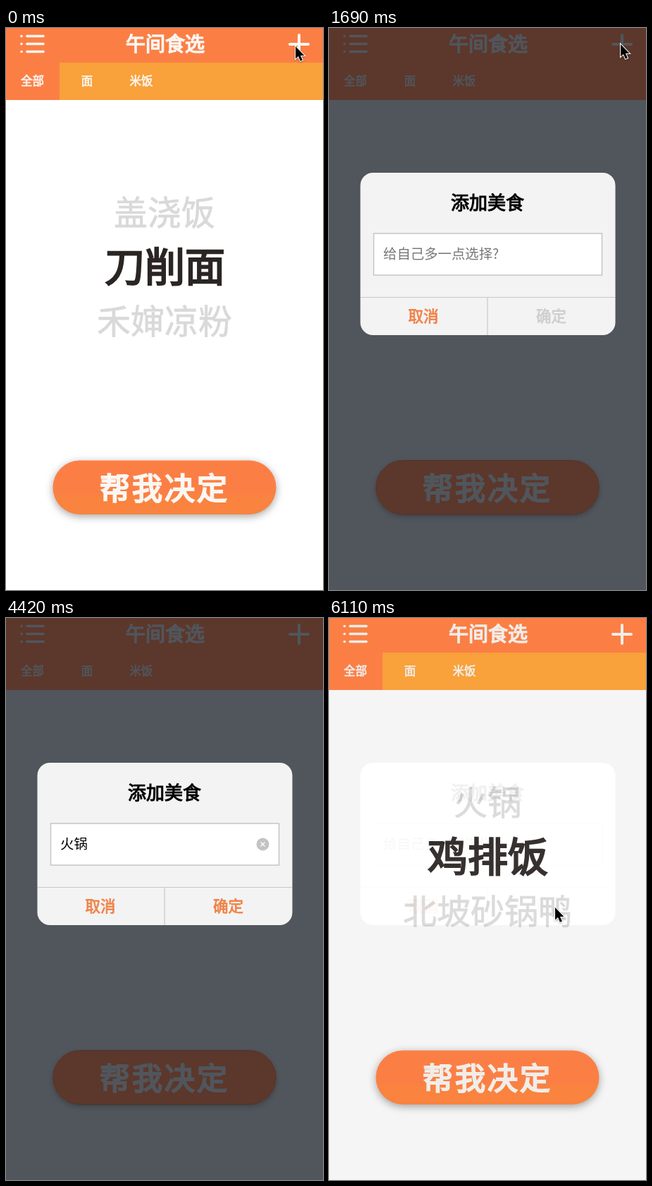
These frames come from a looping animation (450 px wide and 796 px high, 6.24 s). An HTML page:

```html
<!DOCTYPE html>
<html lang="zh-CN">
<head>
<meta charset="utf-8">
<title>午间食选</title>
<style>
  html, body { margin: 0; width: 100%; height: 100%; overflow: hidden; background: #fff; }
  svg { display: block; width: 450px; height: 796px; }
  text { font-family: "Noto Sans CJK SC", "Noto Sans CJK", sans-serif; fill: currentColor; white-space: pre; }
  .mid { text-anchor: middle; }
  .semi { stroke: currentColor; stroke-width: .04em; }
  .heavy { stroke: currentColor; stroke-width: .052em; }
  .tab { font-size: 16.5px; }
  .item { font-size: 48px; color: #d9d9d9; stroke: currentColor; stroke-width: .016em; }
  .field { font-size: 19.4px; }
  .action { font-size: 21.5px; }
  .pick { font-size: 20px; color: #5c5c5c; }
  .line { fill: none; stroke: currentColor; stroke-linecap: round; }
  #button { filter: drop-shadow(0 3px 6px rgba(0, 0, 0, .35)); }
  #dimButton { filter: drop-shadow(0 3px 3px rgba(0, 0, 0, .2)); }
  #ime { filter: drop-shadow(0 2px 3px rgba(0, 0, 0, .35)); }
  #cursor { filter: drop-shadow(0 1px 1px rgba(0, 0, 0, .3)); }
</style>
</head>
<body>
<svg viewBox="0 0 450 796">
  <defs>
    <linearGradient id="warm" x2="0" y2="1">
      <stop offset=".6" stop-color="#fb7f45"/>
      <stop offset=".66" stop-color="#f9833f"/>
    </linearGradient>
    <linearGradient id="panel" x2="0" y2="1">
      <stop stop-color="#f7f7f7"/>
      <stop offset="1" stop-color="#ebebeb"/>
    </linearGradient>
    <g id="labels">
      <path class="line" stroke-width="3.6" d="M30 11.5H53M30 22.5H53M30 33.5H53M22 11.5h.1M22 22.5h.1M22 33.5h.1"/>
      <path class="line" stroke-width="4" d="M403 23H429M416 10V36"/>
      <text class="mid heavy" x="226" y="32.5" font-size="28">午间食选</text>
      <text class="mid semi tab" x="37.5" y="81">全部</text>
      <text class="mid semi tab" x="115" y="81">面</text>
      <text class="mid semi tab" x="192" y="81">米饭</text>
      <text class="heavy" x="133" y="667.5" font-size="43" letter-spacing="3">帮我决定</text>
    </g>
  </defs>

  <rect width="450" height="796" fill="#fff"/>
  <rect width="450" height="102" fill="#fb7f45"/>
  <rect x="76" y="49" width="374" height="53" fill="#f9a13a"/>
  <rect id="button" x="66.5" y="612.5" width="317" height="76.5" rx="38" fill="url(#warm)"/>
  <use href="#labels" color="#fbf7f3"/>
  <text class="mid item" id="above" x="225" y="279"></text>
  <text class="mid semi" id="chosen" x="225.5" y="359" font-size="57" color="#2b2524"></text>
  <text class="mid item" id="below" x="225" y="433"></text>

  <g id="modal">
    <path fill="#50565c" fill-rule="evenodd"
      d="M0 102H450V796H0zM104.5 612.5H345.5a38 38 0 0 1 0 76.5H104.5a38 38 0 0 1 0-76.5z"/>
    <g id="brown" fill="#5c372b">
      <rect width="450" height="102"/>
      <rect id="dimButton" x="66.5" y="612.5" width="317" height="76.5" rx="38" stroke="#4c3129"/>
    </g>
    <use href="#labels" color="#50565c"/>
    <rect x="44.5" y="205" width="362" height="230" rx="18" fill="#f3f3f3"/>
    <text class="mid semi" x="225" y="256.5" font-size="26">添加美食</text>
    <rect x="63.5" y="291" width="324" height="59" fill="#fff" stroke="#c2c2c2" stroke-width="1.4"/>
    <path d="M45 381.5H406M225 381.5V435" stroke="#c8c8c8" stroke-width="1.2"/>
    <text class="field" id="value" x="77" y="326.5"></text>
    <path id="underline" stroke="#000" stroke-width="1.5"/>
    <path id="caret" stroke="#000" stroke-width="1.4"/>
    <g id="clear">
      <circle cx="364.5" cy="320.5" r="9" fill="#c3c3c3"/>
      <path d="M361.5 317.5l6 6m0-6l-6 6" stroke="#fff" stroke-width="1.3"/>
    </g>
    <text class="mid semi action" x="134" y="415.5" color="#f08349">取消</text>
    <text class="mid semi action" id="confirm" x="315.5" y="415.5">确定</text>
  </g>

  <g id="ime">
    <rect x="77" y="348.5" width="390" height="66" rx="3" fill="url(#panel)" stroke="#b5b5b5"/>
    <g color="#3b9fc8">
      <text id="pinyin" x="91" y="372" font-size="19"></text>
      <path id="imeCaret" stroke="currentColor" stroke-width="1.5"/>
    </g>
    <text class="pick" x="92" y="404" style="color:#3b9fc8">1.火锅</text>
    <text class="pick" x="161" y="404">2.</text>
    <path d="M180 394h23q-1 10-8 11h-7q-7-1-8-11z" fill="#77787a"/>
    <ellipse cx="191.5" cy="393" rx="11.5" ry="4.5" fill="#4b4a4a"/>
    <ellipse cx="191.5" cy="393" rx="8.5" ry="3" fill="#d9763f"/>
    <path d="M181 385l17 5M182 388l15 5" stroke="#8d6b55"/>
    <text class="pick" x="221" y="404">3.活该</text>
    <text class="pick" x="293" y="404">4.货柜</text>
    <text class="pick" x="365" y="404">5.火攻</text>
    <path d="M445 396l-5 4.5 5 4.5" fill="none" stroke="#777" stroke-width="2.5"/>
  </g>

  <path id="cursor" d="M0 0V17.5L4 14l2.9 6.8 3-1.3L7 13h5.5z" stroke="#fff" stroke-width="2" paint-order="stroke"/>
</svg>

<script>
const LOOP = 6240, STEP = 130;
const FOCUS = 2860, TYPE = 3510, COMMIT = 4420, MOVE = 4680, CLICK = 5720, CLOSE = 5960;
const PLACEHOLDER = "给自己多一点选择?";
const TYPED = ["h", "huo", "huo'g", "huo'gu", "huo'guo"];
// pointer stops: time, x, y
const STOPS = [[0, 411, 26], [260, 414, 23], [1690, 414, 23],
  [2600, 248, 313], [MOVE, 248, 313], [5561, 321, 410], [LOOP, 321, 410]];

const $ = id => document.getElementById(id);
const clamp = v => Math.max(0, Math.min(1, v));
const show = (id, on) => $(id).setAttribute("visibility", on ? "visible" : "hidden");

function setText(id, s) {
  if ($(id).textContent !== s) $(id).textContent = s;
}

function pointer(t) {
  const i = STOPS.findIndex(s => s[0] > t);
  const [t0, x0, y0] = STOPS[i - 1], [t1, x1, y1] = STOPS[i];
  const u = (t - t0) / (t1 - t0), k = u * u * (3 - 2 * u);
  return [x0 + (x1 - x0) * k, y0 + (y1 - y0) * k];
}

function drawList(t) {
  const names = t < CLICK ? ["盖浇饭", "刀削面", "禾婶凉粉"] : ["火锅", "鸡排饭", "北坡砂锅鸭"];
  ["above", "chosen", "below"].forEach((id, i) => setText(id, names[i]));
}

function drawField(t) {
  const composing = t >= TYPE && t < COMMIT;
  const letters = composing ? TYPED[Math.min(TYPED.length - 1, Math.floor((t - TYPE) / STEP))] : "";
  const value = letters || (t >= COMMIT && t < CLOSE ? "火锅" : "");
  const focused = t >= FOCUS && t < MOVE;
  const blink = composing || (t - FOCUS) % 1040 < 520;

  setText("value", value || PLACEHOLDER);
  $("value").style.color = value ? "#000" : "#777";
  $("value").style.fontSize = letters ? "19px" : "";
  $("confirm").style.color = value ? "#f08349" : "#cfcfcf";
  show("clear", value);

  const end = 77.5 + (value ? $("value").getComputedTextLength() : 0);
  $("caret").setAttribute("d", `M${end} 309V331`);
  show("caret", focused && blink);
  $("underline").setAttribute("d", `M77 329H${end}`);
  show("underline", composing);

  setText("pinyin", letters);
  $("imeCaret").setAttribute("d", `M${92 + $("pinyin").getComputedTextLength()} 354V376`);
  show("ime", composing);
}

function draw(t) {
  const fade = Math.min(clamp((t - 500) / 160), clamp((CLOSE + 160 - t) / 160));
  $("modal").setAttribute("opacity", fade);
  $("brown").setAttribute("opacity", fade);
  drawList(t);
  drawField(t);
  $("cursor").setAttribute("transform", `translate(${pointer(t)})`);
  show("cursor", t < TYPE || t >= MOVE);
}

const start = performance.now();
function tick() {
  const t = (performance.now() - start) % LOOP;
  draw(Math.floor(t / STEP) * STEP);
  requestAnimationFrame(tick);
}
tick();
</script>
</body>
</html>
```
